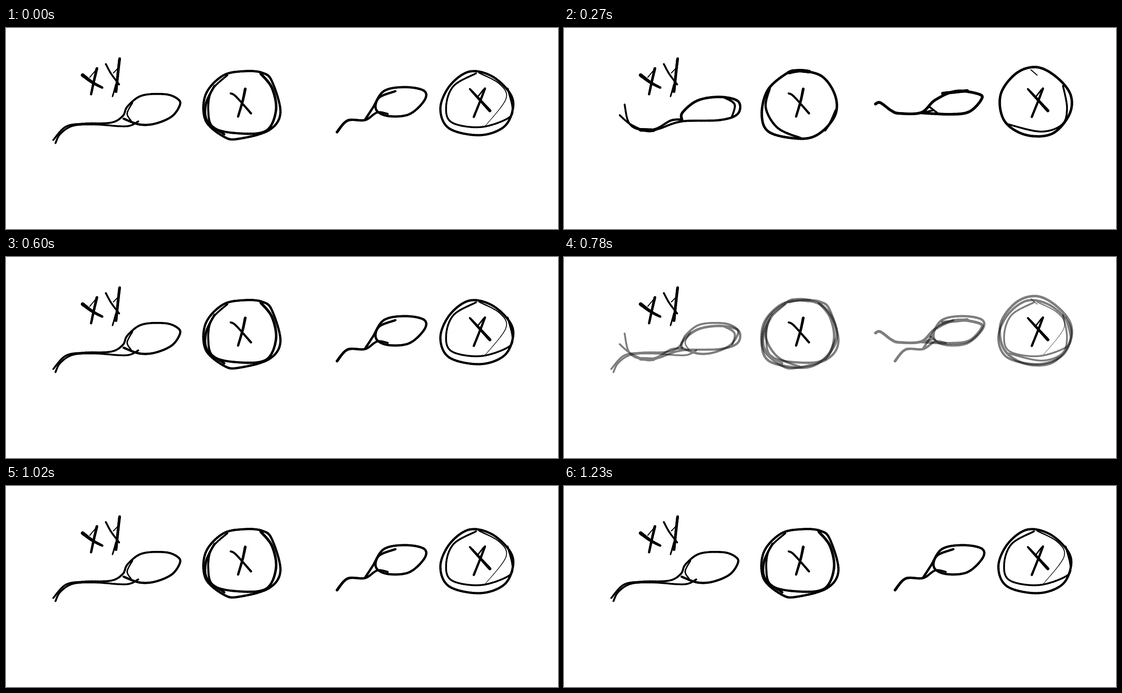
Animation, 1239 px wide and 452 px high, one loop 1260 ms. Source, as an HTML page with a canvas:

```html
<!DOCTYPE html>
<html>
<head>
<meta charset="utf-8">
<style>
html, body { margin: 0; width: 100%; height: 100%; overflow: hidden; background: #fff; }
canvas { position: absolute; left: 0; top: 0; }
</style>
</head>
<body>
<script>
const spline = (a, b, c, d, t) =>
  b + t / 2 * (c - a + t * (2 * a - 5 * b + 4 * c - d + t * (3 * (b - c) + d - a)));

// Smooth pen line through "x y x y ..." whose width runs from w0 to w1.
function drawLine(ctx, text, w0, w1, closed) {
  const v = text.split(' ').map(Number);
  const count = v.length / 2;
  const spans = closed ? count : count - 1;
  const at = (i, j) => v[2 * (closed ? (i + count) % count : Math.max(0, Math.min(i, count - 1))) + j];
  const point = u => {
    const i = Math.min(Math.floor(u), spans - 1);
    return [0, 1].map(j => spline(at(i - 1, j), at(i, j), at(i + 1, j), at(i + 2, j), u - i));
  };
  const steps = spans * 10;
  for (let n = 0; n < steps; n++) {
    ctx.lineWidth = w0 + (w1 - w0) * n / steps;
    ctx.beginPath();
    ctx.moveTo(...point(n / 10));
    ctx.lineTo(...point((n + 1) / 10));
    ctx.stroke();
  }
}

function layer(sketch) {
  const canvas = document.createElement('canvas');
  canvas.width = 1239;
  canvas.height = 452;
  document.body.append(canvas);
  const ctx = canvas.getContext('2d');
  ctx.lineCap = 'round';
  sketch(
    (text, w0, w1 = w0) => drawLine(ctx, text, w0, w1, false),
    (text, w) => drawLine(ctx, text, w, w, true)
  );
  return canvas;
}

function letters(pen) {
  pen('172 106 195 123 216 134', 8, 5);
  pen('204 91 197 121 191 149', 6, 5);
  pen('188 111 203 93', 2);
  pen('224 81 236 103 254 127', 4);
  pen('255 69 252 95 247 143', 6);
  pen('250 92 241 101', 2);
  pen('247 127 243 141 239 154', 4, 3);
  pen('504 147 516 154 550 192', 4, 5);
  pen('537 137 531 165 521 199', 6, 5);
  pen('1041 137 1053 150 1086 186', 4, 7);
  pen('1075 136 1066 160 1050 200', 5);
  pen('1072 138 1058 156', 3);
}

function tailsDown(pen, loop) {
  // left swimmer
  pen('297 210 270 221 200 217 150 220 122 238 111 259', 4);
  pen('106 252 134 222 175 215 235 213 262 198 273 176 305 152 358 149 386 160 390 174 372 199 335 215 300 217 264 204', 4, 5);
  pen('281 209 272 192 284 168', 3);
  // left cell
  loop('537 97 487 107 448 150 448 208 490 245 523 249 590 230 616 190 597 120 576 101', 5);
  pen('497 106 462 140 454 185 466 224 523 237 584 231 606 185 597 135 572 103', 4, 6);
  pen('468 130 449 170 452 210 490 239', 5);
  // right swimmer
  pen('743 234 767 208 806 207 833 190 857 193', 6, 4);
  pen('806 206 823 180 848 142 895 133 938 141 939 163 905 194 858 198 831 184 837 157 874 142', 5);
  // right cell
  loop('1040 98 1090 108 1130 145 1138 180 1118 222 1064 241 995 226 975 181 996 130', 5);
  pen('1055 102 1005 130 988 175 1000 212 1064 223 1125 204 1137 182 1126 136', 4);
  pen('1062 101 1108 126 1122 160 1075 221', 3, 1);
}

function tailsUp(pen, loop) {
  // left swimmer
  pen('265 208 266 190 300 163 350 155 391 165 390 193 350 207 265 210 215 226 187 232 150 217 125 196', 6, 4);
  pen('265 206 240 208 205 227 168 228 145 212 136 172', 5, 4);
  pen('172 229 200 230', 8);
  pen('360 156 383 172 376 202', 5, 4);
  // left cell
  loop('527 96 578 108 608 150 609 195 575 236 532 249 462 235 444 196 457 140 500 102', 5.5);
  pen('462 135 453 180 480 225 532 248', 5);
  pen('610 185 598 212 586 230', 5);
  pen('505 100 527 96 550 98', 8);
  // right swimmer
  pen('699 171 710 168 735 186 753 192 802 190 833 162 880 142 932 149 936 162 910 188 870 194 802 191', 6);
  pen('820 177 838 191', 4);
  pen('803 191 829 185', 4);
  pen('850 147 905 141', 7);
  // right cell
  loop('1061 88 1105 110 1137 150 1134 195 1095 238 1035 240 988 208 980 150 1015 102', 5.5);
  pen('995 216 1070 233 1118 217 1129 180 1120 130', 4);
  pen('1048 94 1062 106', 2);
}

layer(letters);
const down = layer(tailsDown), up = layer(tailsUp);

// One wiggle is seven 30 ms ticks; the poses dissolve for one tick at each swap.
const upOpacity = [0, 0.5, 1, 1, 1, 0.5, 0];
const start = performance.now();

function draw() {
  const elapsed = Math.max(0, performance.now() - start);
  const mix = upOpacity[Math.floor(elapsed / 30) % 7];
  up.style.opacity = mix;
  down.style.opacity = 1 - mix;
  requestAnimationFrame(draw);
}
draw();
</script>
</body>
</html>
```
